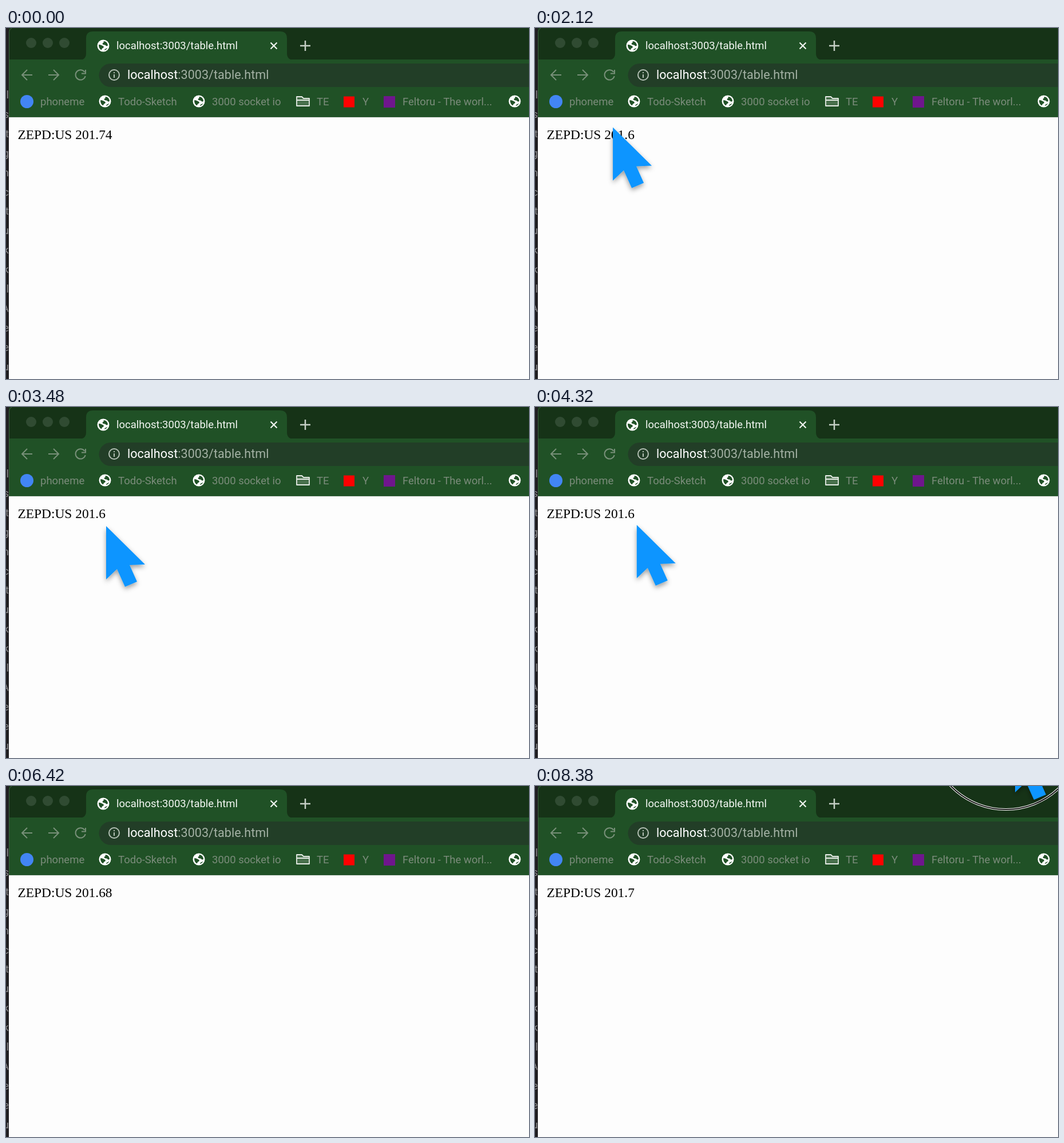
Write an HTML page that moves like this. It is 914 px wide and 613 px high and loops after 8.48 s.

```html
<!DOCTYPE html>
<html lang="en">
<head>
<meta charset="utf-8">
<title>Live price</title>
<style>
html, body { margin: 0; width: 100%; height: 100%; overflow: hidden; background: #fdfdfd; }
svg { display: block; width: 914px; height: 613px; }
text { white-space: pre; }
.ui { font-family: Roboto, Inter, sans-serif; font-size: 18.5px; }
.url { font-size: 21.6px; }
.marks { fill: #7b8c7b; }
.price { font-family: "Liberation Serif", serif; font-size: 23.4px; }
.icon { fill: none; stroke: #789079; stroke-width: 2; }
</style>
</head>
<body>
<svg viewBox="0 0 914 613">
  <defs>
    <g id="globe">
      <circle r="10.5" fill="#fff"/>
      <path d="M-7.8-2C-4.5-2-3-.5-.8.2 1.8 1 1 3.8-1.2 4.2-2.7 4.7-2 7-3.8 7.2-6.8 5.2-8.4 1.8-7.8-2Z
        M.5-8C4.5-8 7.7-4.8 8-.8 6.7 1.7 4.8.2 3.5-1.3 1.4-1.6-.8-1.5-1.4-3.2-1.3-5.3.8-4.6.7-6.2Z
        M2 8C2 5.8 4.8 5.4 7.2 3.6 6.2 6 4.4 7.5 2 8Z" fill="#205126"/>
    </g>
    <filter id="shadow" x="-30%" y="-20%" width="160%" height="150%">
      <feDropShadow dx="0" dy="4" stdDeviation="4" flood-color="#000" flood-opacity=".38"/>
    </filter>
    <clipPath id="edge"><rect width="4" height="613"/></clipPath>
  </defs>

  <rect width="914" height="613" fill="#fdfdfd"/>
  <rect width="5" height="613" fill="#1f1e21"/>
  <g id="sidebar" class="ui" fill="#8b8b8d" clip-path="url(#edge)" text-anchor="end"></g>

  <rect x="5" width="909" height="56" fill="#163317"/>
  <rect x="5" y="55" width="909" height="101" fill="#205126"/>
  <path d="M5.5 156V8Q5.5 2 10 .5" fill="none" stroke="#3d6341"/>
  <path d="M5 155.5H914" stroke="#42694a"/>
  <path d="M128 56Q140 56 140 44V18Q140 6 152 6H479Q491 6 491 18V44Q491 56 503 56Z" fill="#205126"/>
  <g fill="#304b32"><circle cx="44" cy="26" r="9"/><circle cx="73" cy="26" r="9"/><circle cx="102" cy="26" r="9"/></g>
  <use href="#globe" x="170" y="31"/>
  <text class="ui" x="193" y="37" fill="#f4f8f4">localhost:3003/table.html</text>
  <path d="M462.5 25.5L473.5 36.5M473.5 25.5L462.5 36.5" stroke="#f0f5f0" stroke-width="2.2"/>
  <path d="M514 31H532M523 22V40" stroke="#c6d0c6" stroke-width="2.5"/>

  <g class="icon">
    <path d="M46 82H28M37 73L28 82L37 91M74 82H92M83 73L92 82L83 91"/>
    <path d="M137.5 77A8.7 8.7 0 1 0 138.7 84M139 73V79.5H132"/>
  </g>
  <path d="M914 62H183A20.5 20.5 0 0 0 183 103H914Z" fill="#223e27"/>
  <circle cx="189" cy="82" r="9" fill="none" stroke="#b4c0b5" stroke-width="2"/>
  <path d="M189 81V87M189 77V79" stroke="#b4c0b5" stroke-width="2"/>
  <text class="ui url" x="212" y="89" fill="#a3b1a4"><tspan fill="#fff">localhost</tspan>:3003/table.html</text>

  <circle cx="36.5" cy="128.5" r="11.5" fill="#4285f4"/>
  <use href="#globe" x="173" y="128"/>
  <use href="#globe" x="337" y="128"/>
  <use href="#globe" x="889" y="128"/>
  <path d="M508 136V120H517L520 123H530V136ZM508 126H530" fill="#48704c" stroke="#e5ebe5" stroke-width="1.8" stroke-linejoin="round"/>
  <rect x="590" y="119.5" width="19" height="19" fill="#f00"/>
  <rect x="660" y="119" width="20" height="20" fill="#6f168d"/>
  <g class="ui marks">
    <text x="60" y="135">phoneme</text>
    <text x="196" y="135">Todo-Sketch</text>
    <text x="360" y="135">3000 socket io</text>
    <text x="543" y="135">TE</text>
    <text x="623" y="135">Y</text>
    <text x="693" y="135">Feltoru - The worl...</text>
  </g>

  <text id="price" class="price" x="20.5" y="194"></text>
  <g id="ring" fill="none">
    <circle cx="823" cy="-93" r="134" stroke="#fff" stroke-width="4"/>
    <circle cx="823" cy="-93" r="134" stroke="#111" stroke-width="2"/>
  </g>
  <path id="cursor" d="M0 0L68 67L41 68L54 97L33 106L19 75L0 93Z" fill="#0a95ff" filter="url(#shadow)"/>
</svg>
<script>
const LOOP = 8480;
const byId = id => document.getElementById(id);
const price = byId("price"), cursor = byId("cursor"), ring = byId("ring");

// time, quote
const quotes = [[0, 201.74], [960, 201.7], [1820, 201.6], [4480, 201.56], [6280, 201.68], [8000, 201.7]];

// time, tip x, tip y
const path = [
  [0, 900, -130], [980, 900, -130], [1420, 171, 57], [1800, 140, 165],
  [2640, 128, 191], [3480, 175, 208], [4460, 178, 206], [4960, 520, -130],
  [6500, 860, -130], [7000, 848, -78], [7440, 846, -76], [8000, 842, -80],
  [8380, 839, -82], [LOOP, 839, -82]
];

[..."lstgmctukklAeeu"].forEach((letter, i) => {
  const label = document.createElementNS("http://www.w3.org/2000/svg", "text");
  label.setAttribute("x", 5);
  label.setAttribute("y", 123 + i * 33.9);
  label.textContent = letter;
  byId("sidebar").append(label);
});

function tipAt(t) {
  const i = path.findIndex(p => p[0] > t);
  const [t0, x0, y0] = path[i - 1], [t1, x1, y1] = path[i];
  const u = (t - t0) / (t1 - t0), k = u * u * (3 - 2 * u);
  return [x0 + (x1 - x0) * k, y0 + (y1 - y0) * k];
}

function draw(t) {
  const quote = quotes.filter(q => q[0] <= t).pop()[1];
  price.textContent = "ZEPD:US " + quote;
  cursor.setAttribute("transform", `translate(${tipAt(t)})`);
  ring.setAttribute("visibility", t >= 8300 ? "visible" : "hidden");
}

const start = performance.now();
function tick() {
  draw((performance.now() - start) % LOOP);
  requestAnimationFrame(tick);
}
tick();
</script>
</body>
</html>
```
